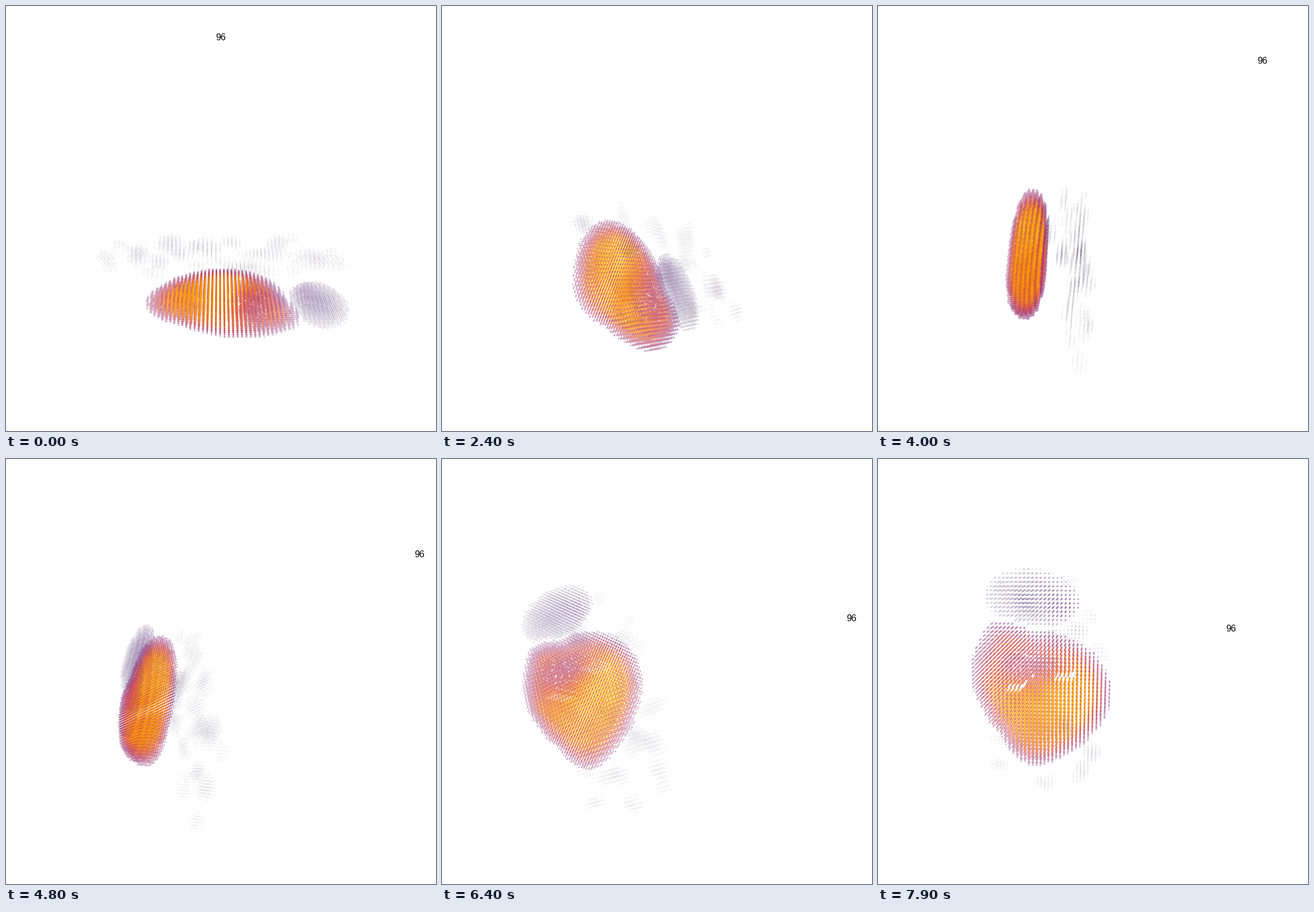
Animation of 753x744 px, one loop 8000 ms. Source, as a matplotlib script:

```python
import numpy as np
import matplotlib.pyplot as plt
from matplotlib.animation import FuncAnimation

W, H, DPI = 753, 744, 100
FRAMES, STEP = 80, 100
PITCH = 7.0
FOCAL = 1000.0

# The cloud turns at a steady rate about one tilted axis.
# Screen axes: right, up, toward the viewer.
AXIS = np.array([.62, .715, -.31])
AXIS /= np.linalg.norm(AXIS)
RATE = np.radians(2.92)
TILT = np.arctan2(.91, .4)
START = np.array([[1, 0, 0],
                  [0, np.cos(TILT), np.sin(TILT)],
                  [0, -np.sin(TILT), np.cos(TILT)]])

# Key points of the two orbits around the stage centre.
KEYS = np.array([0, 11, 24, 32, 48, 64, 79], float)
BODY = [(375, 515), (358, 519), (320, 489), (289, 464), (246, 429), (245, 415), (285, 415)]
LABEL = [(376, 55), (417, -12), (506, -18), (596, 28), (724, 167), (717, 279), (618, 296)]

# Outline of the main body in the (v, u) plane, apex down.
OUTLINE = np.array([(-15, -130), (48, -106), (93, -67), (118, -25), (124, 5), (112, 50),
                    (82, 87), (45, 106), (-15, 114), (-85, 130), (-122, 60),
                    (-104, -25), (-72, -72), (-36, -122)], float)


def spline(t, vals):
    """Cubic Hermite curve through the key points."""
    vals = np.asarray(vals, float)
    slope = np.gradient(vals, KEYS, axis=0, edge_order=2)
    i = int(np.clip(np.searchsorted(KEYS, t, side="right") - 1, 0, len(KEYS) - 2))
    d = KEYS[i + 1] - KEYS[i]
    s = (t - KEYS[i]) / d
    return ((1 + 2 * s) * (1 - s) ** 2 * vals[i] + s * (1 - s) ** 2 * d * slope[i]
            + s * s * (3 - 2 * s) * vals[i + 1] + s * s * (s - 1) * d * slope[i + 1])


def rotation(angle):
    x, y, z = AXIS
    k = np.array([[0, -z, y], [z, 0, -x], [-y, x, 0]])
    return np.eye(3) + np.sin(angle) * k + (1 - np.cos(angle)) * k @ k


def bump(p, centre, radii):
    return np.exp(-(((p - centre) / radii) ** 2).sum(axis=1))


def faint_tissue(p, rng):
    """Random soft patches spread over a sheet behind the body."""
    total = np.zeros(len(p))
    for i, u in enumerate(np.linspace(-195, 195, 30)):
        v = 95 * np.sin(2.4 * i)
        w = 80 - .22 * v + rng.uniform(-24, 24)
        radii = rng.uniform((14, 14, 8), (32, 30, 16))
        total += rng.uniform(.05, .13) * bump(p, (u, v, w), radii)
    return total


def build():
    rng = np.random.default_rng(96)
    spans = (-224, 224), (-133, 133), (-35, 126)
    grid = np.meshgrid(*(np.arange(a, b + 1, PITCH) for a, b in spans), indexing="ij")
    p = np.stack(grid, axis=-1).reshape(-1, 3)
    u, v, w = p.T
    noise = rng.random(len(p))
    wave = np.sin(u / 13 + v / 21) * np.sin(v / 15 - w / 11) * np.cos(w / 9 + u / 25)

    # main body: a flat rounded slab, hot inside, with a cooler cavity
    edge = np.interp(np.arctan2(u, v), np.arctan2(OUTLINE[:, 1], OUTLINE[:, 0]),
                     np.hypot(*OUTLINE.T), period=2 * np.pi)
    q = ((np.hypot(u, v) / edge) ** 2.5 + (np.abs(w) / 32) ** 2.5) ** .4
    depth = np.clip((1 - q) / .26, 0, 1)
    cavity = bump(p, (55, -20, -4), (34, 66, 45))
    body = (.3 + .45 * depth ** .8 + .09 * depth * bump(p, (5, 55, 0), (80, 60, 40))
            - .25 * cavity * depth - .06 / (1 + np.exp(-(u - 55) / 14))
            + .04 * wave + .04 * (noise - .5))
    slit = (np.abs(u - 25 - .24 * v) < 3.6) & (np.abs(np.abs(v) - 42) < 15)
    in_body = (q < 1) & ~slit & ~((cavity > .5) & (noise < .08))

    # paler chamber beside it
    q2 = np.sqrt(((u - 168 + .06 * v) / 50) ** 2 + ((v + 15) / 83) ** 2 + (w / 26) ** 2)
    side = (.1 + .13 * np.clip(1 - q2, 0, 1) + .03 * wave
            + .16 * bump(p, (148, 42, 0), (24, 32, 30)))
    in_side = (q2 < 1) & (q > 1.07)

    faint = faint_tissue(p, rng) * (.7 + .6 * wave + .4 * noise)
    in_faint = (faint > .036) & (q > 1.1)

    val = np.select([in_body, in_side], [body, side], faint)
    keep = in_body | in_side | in_faint
    p, val = p[keep], np.clip(val[keep], 0, .86)
    color = plt.get_cmap("inferno")(val)
    color[:, 3] = np.minimum(val * .92, .75)
    return p, color


points, colors = build()

fig = plt.figure(figsize=(W / DPI, H / DPI), dpi=DPI, facecolor="white")
ax = fig.add_axes([0, 0, 1, 1])
ax.set_xlim(0, W)
ax.set_ylim(H, 0)
ax.axis("off")
cloud = ax.scatter(points[:, 0], points[:, 1], s=4.6, c=colors, linewidths=0)
label = ax.text(0, 0, "96", family="Liberation Sans", size=11.5, color="black",
                ha="center", va="baseline")


def update(n):
    x, y, z = rotation(RATE * n) @ START @ points.T
    scale = 1 / (1 - z / FOCAL)
    cx, cy = spline(n, BODY)
    order = np.argsort(z)
    cloud.set_offsets(np.column_stack([cx + x * scale, cy - y * scale])[order])
    cloud.set_facecolors(colors[order])
    tx, ty = spline(n, LABEL)
    label.set_position((tx, ty + 5.5))
    return cloud, label


anim = FuncAnimation(fig, update, frames=FRAMES, interval=STEP, repeat=True,
                     repeat_delay=0, blit=False)
plt.show()
```
